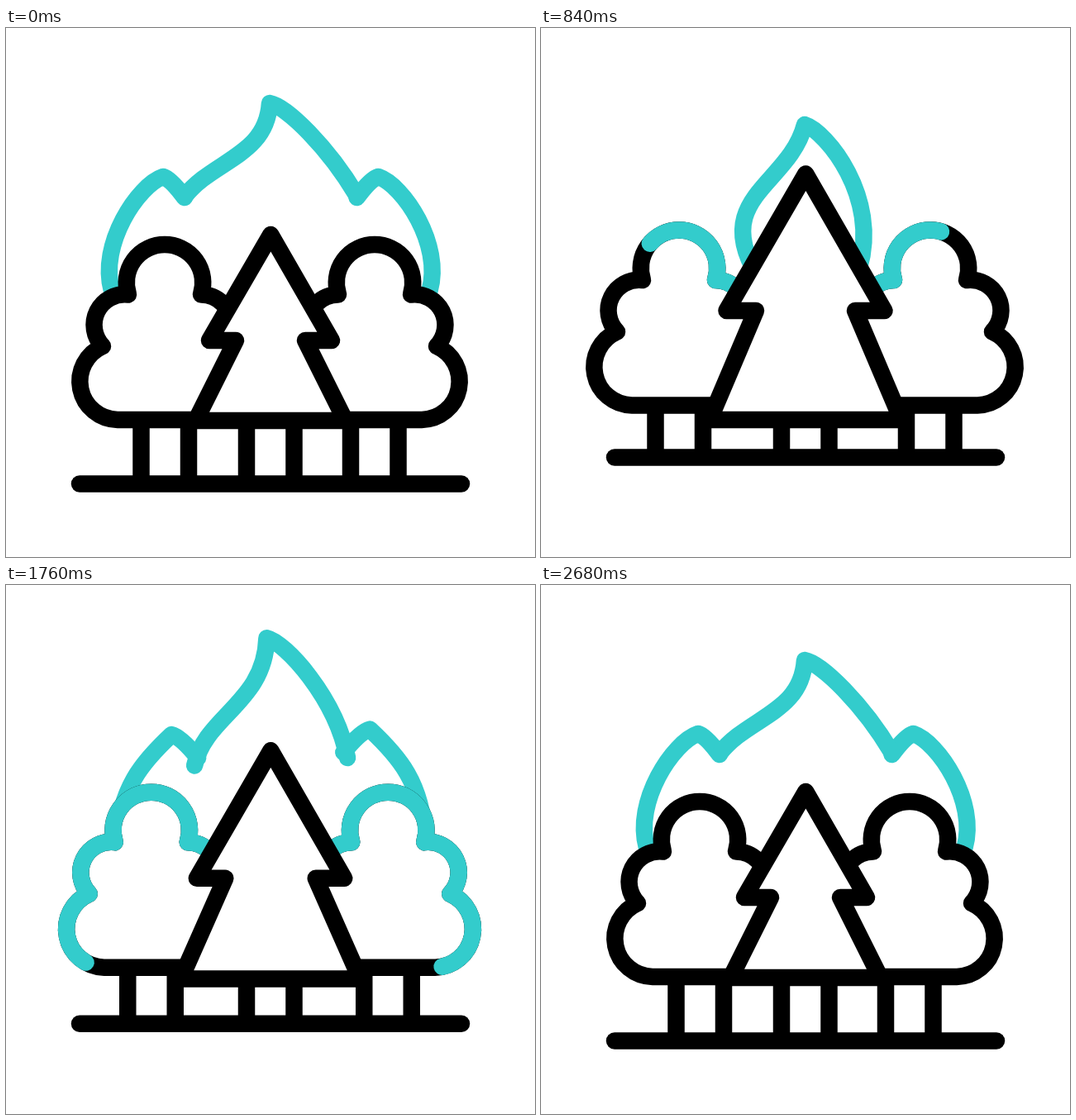
Recreate the animation shown at these times as an HTML page with a canvas. Size 640x640 px, loop 3000 ms.

```html
<!DOCTYPE html>
<html lang="en">
<head>
<meta charset="utf-8">
<title>Forest fire</title>
<style>
  html, body { margin: 0; height: 100%; overflow: hidden; background: #fff; }
  canvas { display: block; width: 100vmin; height: 100vmin; }
</style>
</head>
<body>
<canvas width="640" height="640"></canvas>
<script>
const LOOP = 3000, STEP = 40, TEAL = '#33cccc';
const ctx = document.querySelector('canvas').getContext('2d');

// Central flame: one cubic from the left foot to the tip, one down to the right foot.
const CORE = {
  rest: [216,204, 250,160, 315,155, 319,91, 340,95, 390,145, 424,202],
  mid: [234,309, 174,184, 308,189, 319,111, 350,119, 455,234, 410,305],
  low: [262,320, 205,225, 300,210, 319,137, 345,145, 410,225, 385,310],
  high: [215,197, 255,150, 318,135, 314,54, 335,58, 395,120, 424,188]
};
// Side flame: one cubic from the base to the peak, then the inner end.
const SIDE = {
  rest: [128,318, 112,262, 160,190, 190,180, 216,205],
  low: [130,350, 135,320, 165,310, 186,300, 243,361],
  high: [135,318, 138,235, 165,195, 206,153, 228,168]
};
const BUSH = new Path2D('M273 360A37 37 0 0 0 236 322.5A46.25 46.25 0 1 0 148 322.5' +
  'A37 37 0 0 0 117 385A46.5 46.5 0 0 0 135 474H240');
const BURN_LENGTH = 481, MID = 0.44;

const mix = (a, b, k) => a + (b - a) * k;
const blend = (a, b, k) => a.map((v, i) => mix(v, b[i], k));
const span = (t, from, to) => Math.min(1, Math.max(0, (t - from) / (to - from)));
const smooth = u => u * u * (3 - 2 * u);
const ease = (t, from, to) => smooth(span(t, from, to));
const settle = (t, from, to) => smooth(1 - (1 - span(t, from, to)) ** 1.5);

function line(...p) {
  ctx.beginPath();
  for (let i = 0; i < p.length; i += 2) ctx.lineTo(p[i], p[i + 1]);
  ctx.stroke();
}

function shifted(dx, dy, mirrorAt, draw) {
  ctx.save();
  if (mirrorAt) {
    ctx.translate(mirrorAt, 0);
    ctx.scale(-1, 1);
  }
  ctx.translate(dx, dy);
  draw();
  ctx.restore();
}

function drawFlames(t, sink, pose) {
  const rise = ease(t, 1498, 1900), fall = ease(t, 2170, 2540);
  const shape = (set, sunk) => blend(blend(sunk, set.high, rise), set.rest, fall);
  const core = shape(CORE, sink < MID
    ? blend(CORE.rest, CORE.mid, sink / MID)
    : blend(CORE.mid, CORE.low, (sink - MID) / (1 - MID)));
  const side = shape(SIDE, blend(SIDE.rest, SIDE.low, sink));

  const drawSide = () => {
    const [px, py, ex, ey] = side.slice(6);
    ctx.beginPath();
    ctx.moveTo(side[0], side[1]);
    ctx.bezierCurveTo(...side.slice(2, 8));
    ctx.quadraticCurveTo(mix(px, ex, 0.35), mix(py, ey, 0.1), ex, ey);
    ctx.stroke();
  };

  ctx.strokeStyle = TEAL;
  ctx.lineCap = 'round';
  shifted(0, -20 * pose, 0, () => {
    drawSide();
    shifted(0, -9 * rise * (1 - fall), 640.5, drawSide);
    ctx.beginPath();
    ctx.moveTo(core[0], core[1]);
    ctx.bezierCurveTo(...core.slice(2, 8));
    ctx.bezierCurveTo(...core.slice(8));
    ctx.stroke();
  });
}

function drawBush(t, pose, ground, mirrorAt) {
  const base = -17.5 * pose;
  const burnt = BURN_LENGTH * ease(t, 400, 1440) * (1 - ease(t, 1500, 2730));
  shifted(-25 * pose, base, mirrorAt, () => {
    ctx.strokeStyle = '#000';
    ctx.lineCap = 'butt';
    for (const x of [163.5, 221]) line(x, 474, x, ground - base);
    ctx.fill(BUSH);
    ctx.lineCap = 'round';
    ctx.stroke(BUSH);
    if (burnt < 1) return;
    ctx.strokeStyle = TEAL;
    ctx.setLineDash([burnt, 2000]);
    ctx.stroke(BUSH);
  });
}

function drawPine(pose, grow, ground) {
  const base = 475 + 38 * grow - 39 * pose;
  const tip = base - mix(225, 297.5, grow), arm = base - mix(97, 132, grow);
  const outer = mix(74, 95.5, grow), inner = mix(42, 60, grow), foot = mix(90.5, 116, grow);

  ctx.strokeStyle = '#000';
  ctx.lineCap = 'butt';
  for (const x of [291, 348.5]) line(x, base, x, ground);
  ctx.beginPath();
  ctx.moveTo(320.3, tip);
  for (const [x, y] of [[outer, arm], [inner, arm], [foot, base],
                        [-foot, base], [-inner, arm], [-outer, arm]]) {
    ctx.lineTo(320 + x, y);
  }
  ctx.closePath();
  ctx.fill();
  ctx.stroke();
}

function draw(t) {
  const sink = ease(t, 275, 815);
  const pose = sink * (1 - settle(t, 1550, 2280));
  const grow = ease(t, 200, 815) * (1 - settle(t, 1550, 2370));
  const ground = 551.5 - 32 * pose;

  ctx.fillStyle = '#fff';
  ctx.fillRect(0, 0, 640, 640);
  ctx.lineWidth = 20.5;
  ctx.lineJoin = 'round';
  drawFlames(t, sink, pose);
  drawBush(t, pose, ground, 0);
  drawBush(t - 40, pose, ground, 638);
  drawPine(pose, grow, ground);
  ctx.lineCap = 'round';
  line(89, ground, 551, ground);
}

function tick() {
  const t = performance.now() % LOOP;
  draw(Math.floor(t / STEP) * STEP);
  requestAnimationFrame(tick);
}
tick();
</script>
</body>
</html>
```
